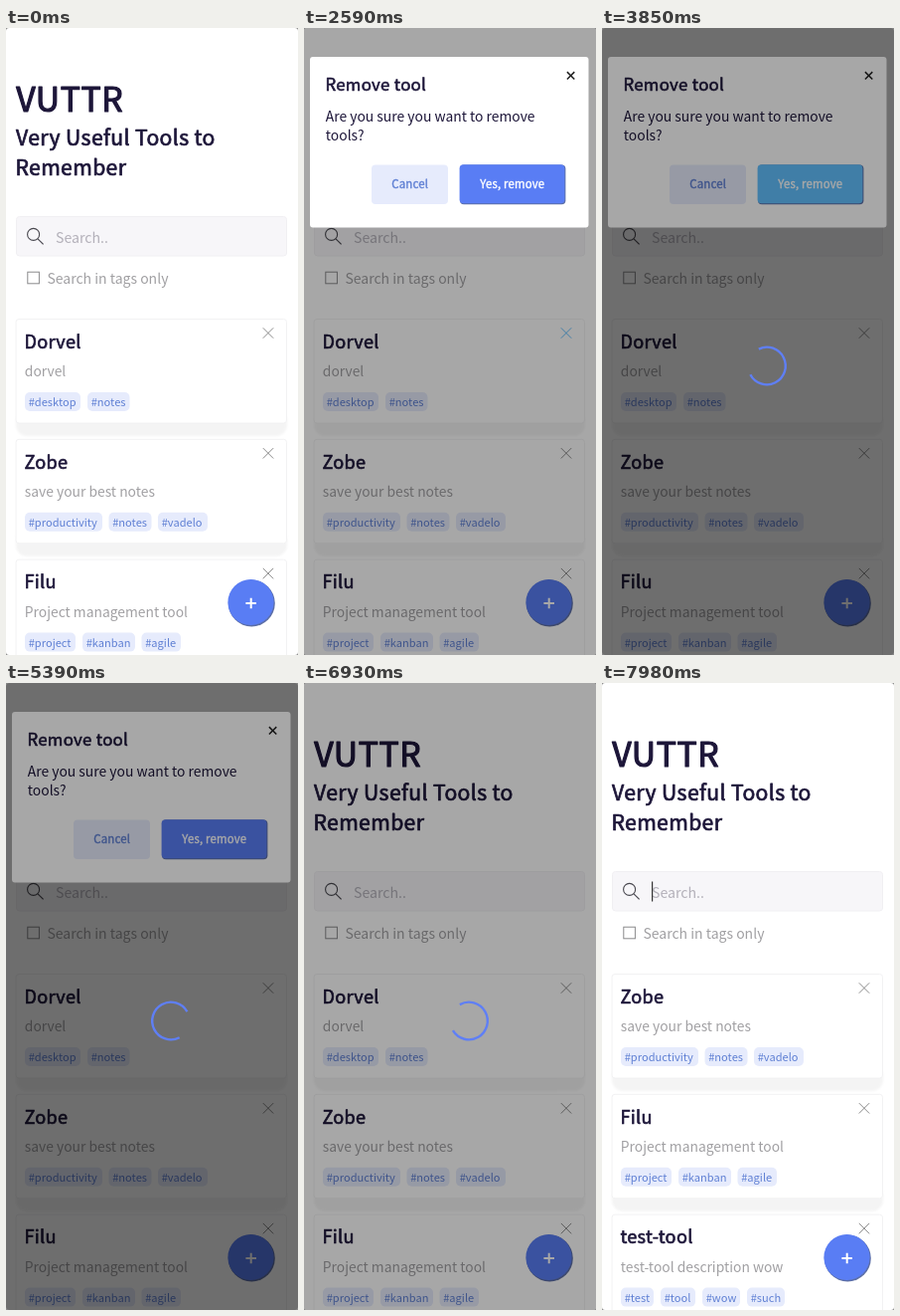
An HTML page for the animation above (8 s loop, 294 by 630 pixels).

```html
<!DOCTYPE html>
<html lang="en">
<head>
<meta charset="utf-8">
<title>Tool list</title>
<style>
  html, body { margin: 0; width: 100%; height: 100%; overflow: hidden; background: #858585; }
  svg { display: block; width: 294px; height: 630px; }
  text {
    font-family: "Noto Sans CJK JP", "Noto Sans CJK SC", "Noto Sans CJK KR", "Source Sans Pro", "Noto Sans", sans-serif;
    fill: currentColor;
    white-space: pre;
  }
  .semi { stroke: currentColor; stroke-width: .035em; stroke-linejoin: round; letter-spacing: .018em; }
</style>
</head>
<body>
<svg id="stage" viewBox="0 0 294 630" xmlns="http://www.w3.org/2000/svg">
  <defs>
    <clipPath id="screen"><rect width="294" height="630" rx="3"/></clipPath>
    <filter id="soft" x="-10%" y="-40%" width="120%" height="180%"><feGaussianBlur stdDeviation=".8"/></filter>
  </defs>
</svg>
<script>
const LOOP = 8000, PITCH = 120.8;
const INK = '#1d1639', GREY = '#a1a0a3', BLUE = '#597df4', EDGE = '#5b6ea8',
      PALE = '#e6ebfc', LINK = '#6080d4', HOVER = '#62c0ff';

const stage = document.getElementById('stage');

function add(parent, name, attrs = {}, content = '') {
  const el = document.createElementNS('http://www.w3.org/2000/svg', name);
  for (const key in attrs) el.setAttribute(key, attrs[key]);
  if (content) el.textContent = content;
  parent.appendChild(el);
  return el;
}
const group = (parent, attrs) => add(parent, 'g', attrs);
const box = (parent, x, y, width, height, fill, more) =>
  add(parent, 'rect', { x, y, width, height, fill, ...more });
const label = (parent, x, y, size, color, content, cls = '') =>
  add(parent, 'text', { x, y, 'font-size': size, color, class: cls }, content);
const line = (parent, d, stroke, width) =>
  add(parent, 'path', { d, stroke, 'stroke-width': width, fill: 'none' });
const cross = (parent, x, y, r, stroke, width) =>
  line(parent, `M${x - r} ${y - r}l${2 * r} ${2 * r}M${x + r} ${y - r}l${-2 * r} ${2 * r}`, stroke, width);
const dim = parent => box(parent, 0, 0, 294, 630, '#000', { 'fill-opacity': .345 });

// Each tag: text, left edge, pill width
const tools = [
  { name: 'Dorvel', about: 'dorvel', tags: [['#desktop', 19, 56], ['#notes', 82, 42.5]] },
  { name: 'Zobe', about: 'save your best notes',
    tags: [['#productivity', 19, 78], ['#notes', 103.5, 43], ['#vadelo', 153, 50]] },
  { name: 'Filu', about: 'Project management tool',
    tags: [['#project', 19, 51], ['#kanban', 77, 53], ['#agile', 136.5, 39.5]] },
  { name: 'test-tool', about: 'test-tool description wow',
    tags: [['#test', 19, 33], ['#tool', 59, 35], ['#wow', 101, 38], ['#such', 146, 38]] },
];

function drawCard(parent, tool) {
  const card = group(parent);
  box(card, 10, 384, 273, 26, '#f4f4f4', { rx: 11, filter: 'url(#soft)' });
  box(card, 10, 292.5, 272.5, 104.5, '#fff', { rx: 3, stroke: '#f2f2f3' });
  label(card, 18.4, 321.8, 18.1, INK, tool.name, 'semi');
  label(card, 18.8, 350.3, 13.85, GREY, tool.about);
  for (const [text, x, w] of tool.tags) {
    box(card, x, 366, w, 19, PALE, { rx: 5 });
    label(card, x + 3.7, 380.4, 11.1, LINK, text);
  }
  const close = cross(card, 264, 306.5, 5.2, '#8b8b8b', 1);
  return { card, close };
}

function drawHeader(parent) {
  label(parent, 10.2, 84, 33.7, INK, 'VUTTR', 'semi');
  label(parent, 10.1, 118, 21.15, INK, 'Very Useful Tools to', 'semi');
  label(parent, 9.5, 148, 21.15, INK, 'Remember', 'semi');
  box(parent, 10.5, 189.5, 272, 39.5, '#f7f6f9', { rx: 3, stroke: '#f0eff2' });
  add(parent, 'circle', { cx: 27.6, cy: 207.4, r: 6, fill: 'none', stroke: '#4a4950', 'stroke-width': 1.1 });
  line(parent, 'M32 211.8L37.6 217.4', '#4a4950', 1.2);
  label(parent, 50, 215.7, 14.15, '#b3b0b9', 'Search..');
  box(parent, 21.8, 245.2, 11.6, 11.6, '#fff', { stroke: '#8a8a8c' });
  label(parent, 41.4, 256.6, 14, GREY, 'Search in tags only');
}

function drawFab(parent) {
  add(parent, 'circle', { cx: 247.3, cy: 578, r: 23.5, fill: EDGE });
  add(parent, 'circle', { cx: 246.5, cy: 577, r: 23.1, fill: BLUE });
  line(parent, 'M241.4 578h10.6M246.7 572.7v10.6', '#fff', 2);
}

function drawModal(parent) {
  box(parent, 6, 29, 280.5, 171.5, '#fff', { rx: 3 });
  cross(parent, 268.6, 47.8, 3.7, '#222', 1.5);
  label(parent, 21.5, 63, 16.8, INK, 'Remove tool', 'semi');
  label(parent, 21.8, 94.4, 13.88, INK, 'Are you sure you want to remove');
  label(parent, 21.8, 113.1, 13.88, INK, 'tools?');
  box(parent, 68, 137.5, 77, 39.5, PALE, { rx: 4 });
  label(parent, 88.2, 161.3, 11.4, LINK, 'Cancel', 'semi');
  box(parent, 157, 137.5, 106.4, 39.8, EDGE, { rx: 4 });
  const face = box(parent, 156.6, 137.3, 105.8, 39, BLUE, { rx: 4 });
  label(parent, 177.2, 161.3, 11.35, '#fff', 'Yes, remove', 'semi');
  return face;
}

const app = group(stage, { 'clip-path': 'url(#screen)' });
box(app, 0, 0, 294, 630, '#fff');
drawHeader(app);
const cards = tools.map(tool => drawCard(app, tool));
const caret = line(app, 'M50.6 199.5v20', '#333', 1.2);
drawFab(app);
const dialog = group(app);
dim(dialog);
const confirm = drawModal(dialog);
const loading = group(app);
dim(loading);

const RING = 18.8, GAP = 92;
const rad = deg => deg * Math.PI / 180;
const point = deg => `${RING * Math.cos(rad(deg))} ${RING * Math.sin(rad(deg))}`;
const spinner = line(loading,
  `M${point(GAP / 2)}A${RING} ${RING} 0 1 1 ${point(-GAP / 2)}`, '#5f7ff5', 2.4);

const ramp = (t, from, to) => Math.min(1, Math.max(0, (t - from) / (to - from)));
const between = (t, from, to) => t >= from && t < to;
const show = (el, on) => el.setAttribute('visibility', on ? 'visible' : 'hidden');

function render(t) {
  const first = t >= 7000 ? 1 : 0;
  cards.forEach(({ card }, i) => {
    card.setAttribute('transform', `translate(0 ${(i - first) * PITCH})`);
    card.setAttribute('display', i >= first && i < first + 3 ? 'inline' : 'none');
  });
  cards[0].close.setAttribute('stroke', between(t, 2450, 2800) ? HOVER : '#8b8b8b');

  dialog.setAttribute('opacity', ramp(t, 2380, 2590) * (1 - ramp(t, 5670, 5880)));
  confirm.setAttribute('fill', between(t, 3570, 4270) ? HOVER : BLUE);

  loading.setAttribute('opacity', ramp(t, 3500, 3780) * (1 - ramp(t, 6930, 7140)));
  const angle = 198 + (t - 3850) * 360 / 1030;
  spinner.setAttribute('transform', `translate(166 339.5) rotate(${angle})`);

  show(caret, t >= 7980);
}

const start = performance.now();
function tick(now) {
  render(Math.max(0, now - start) % LOOP);
  requestAnimationFrame(tick);
}
render(0);
requestAnimationFrame(tick);
</script>
</body>
</html>
```
